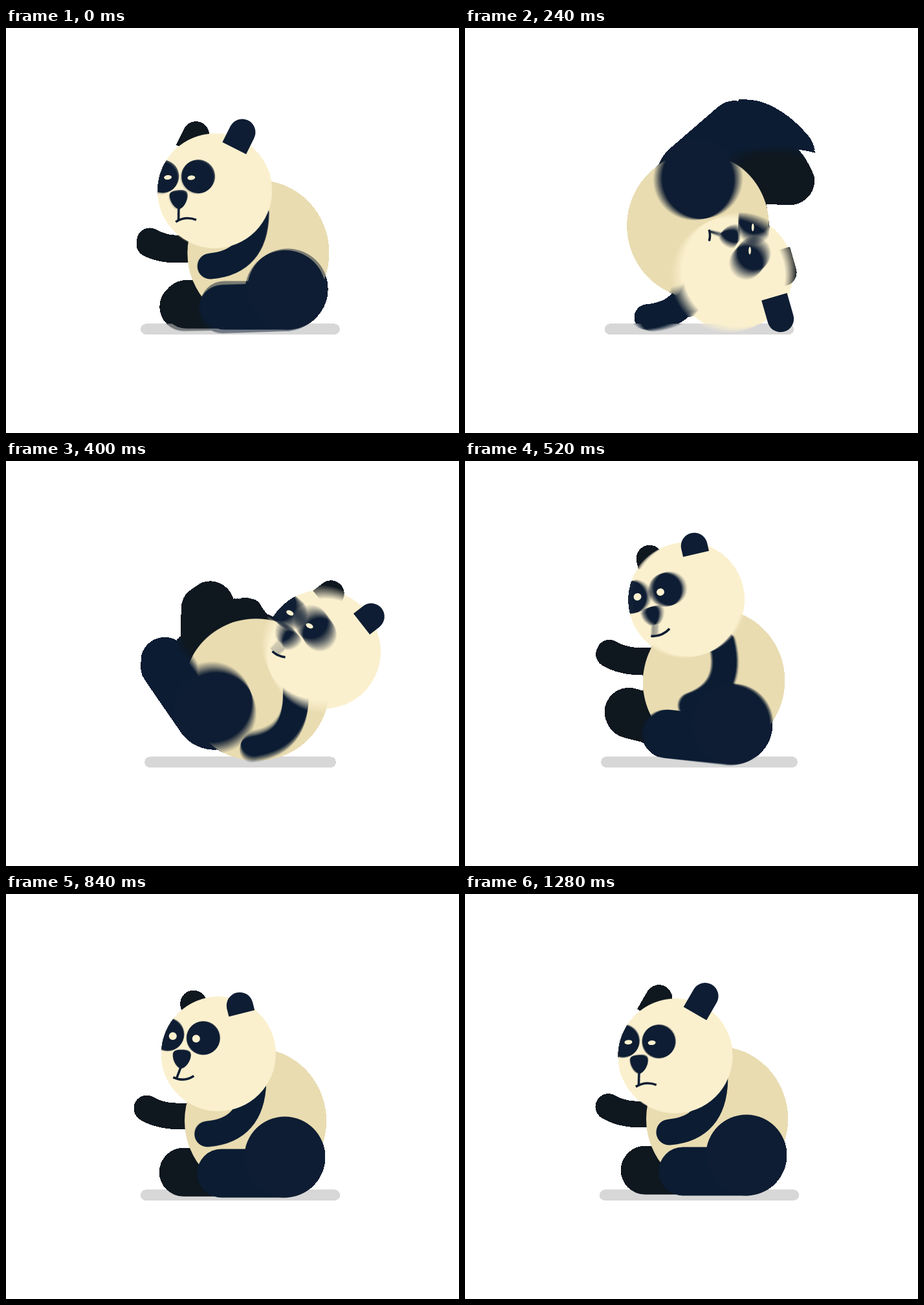
Write an HTML page with a canvas that moves like this. It is 700 px wide and 625 px high and loops after 1320 ms.

```html
<!DOCTYPE html>
<html lang="en">
<head>
<meta charset="utf-8">
<title>Rolling panda</title>
<style>
  html, body { margin: 0; width: 100%; height: 100%; overflow: hidden; background: #fff; }
  canvas { display: block; width: 700px; height: 625px; }
</style>
</head>
<body>
<canvas id="stage" width="700" height="625"></canvas>
<script>
const W = 700, H = 625, LOOP = 1320, STEP = 40;
const SHUTTER = 20, SAMPLES = 12, SOLID = 0.35;
const NAVY = '#0e1d33', LEG = '#0b1c33', DARK = '#0f171f';
const CREAM = '#fbf0ce', BODY = '#e9dcb1', GROUND = '#d7d7d7';
const RAD = Math.PI / 180;

// Key poses: time, body x, y, turn, neck length, neck angle, nod, ear swing
const KEYS = [
  [0, 390, 347, 0, 117, 235, -5.5, 32],
  [120, 352, 335, -78, 96, 233, -37, 68],
  [240, 360, 306, -172, 92, 224.5, -97, 73],
  [400, 387, 353, -265, 119.5, 233.7, -68, 25],
  [520, 384.5, 340, -345, 133, 236.4, -33, 5],
  [640, 385, 350, -360, 118, 238, -6, -10],
  [840, 385.5, 350, -360, 118, 241, 0, -14],
  [1040, 385.5, 349, -360, 122.5, 253.6, 22.5, -29.5],
  [1120, 386, 349, -360, 124, 256, 26, -22],
  [1280, 389.5, 347, -360, 116.5, 236.4, -5, 35]
];
KEYS.push(KEYS[0].map((v, i) => i === 0 ? LOOP : i === 3 ? -360 : v));

const clamp = (v, lo, hi) => Math.min(hi, Math.max(lo, v));
const bump = (t, at, width) => Math.exp(-(((t - at) / width) ** 2));
const ease = (t, from, to) => {
  const u = clamp((t - from) / (to - from), 0, 1);
  return u * u * (3 - 2 * u);
};
const polar = ([x, y], deg, r) => [x + r * Math.cos(deg * RAD), y + r * Math.sin(deg * RAD)];

// Smooth monotone interpolation of the key poses.
function keyed(t) {
  const last = KEYS.length - 1;
  const slope = (i, j) => (KEYS[i + 1][j] - KEYS[i][j]) / (KEYS[i + 1][0] - KEYS[i][0]);
  const tangent = (i, j) => {
    if (i === 0 || i === last) return 0;
    const a = slope(i - 1, j), b = slope(i, j);
    return a * b <= 0 ? 0 : 2 * a * b / (a + b);
  };
  let i = 0;
  while (i < last - 1 && t >= KEYS[i + 1][0]) i++;
  const a = KEYS[i], b = KEYS[i + 1], h = b[0] - a[0], u = (t - a[0]) / h;
  const v = ease(u, 0, 1), p = u * (1 - u) * (1 - u) * h, q = u * u * (u - 1) * h;
  return a.map((from, j) => from + (b[j] - from) * v + tangent(i, j) * p + tangent(i + 1, j) * q);
}

// A limb that keeps its own angle on the stage while its shoulder rolls along.
const arm = (shoulder, angle, length, bend, reach) =>
  [shoulder, polar(shoulder, angle - bend, reach), polar(shoulder, angle, length)];

function pose(t) {
  const [, x, y, turn, neck, neckAngle, nod, swing] = keyed(t);
  const center = [x, y - 25 * bump(t, 180, 35)];
  const onBody = (deg, r) => polar(center, deg + turn, r);
  const look = Math.max(0, nod) / 26, tuck = bump(t, 400, 60), roll = bump(t, 300, 130);
  return {
    center, turn, swing, look, roll,
    head: onBody(neckAngle, neck),
    headTurn: turn + nod,
    earLength: 33 + clamp((swing - 20) * 1.25, 0, 23),
    mood: ease(t, 0, 640) - ease(t, 1130, 1290),
    hip: onBody(51 + 31 * bump(t, 240, 160), 72),
    legTurn: turn - 55 * bump(t, 305, 160),
    smear: bump(t, 240, 40),
    farFoot: onBody(144.5, 136.5 + 22 * bump(t, 240, 200)),
    farLegTurn: turn - 8 * bump(t, 240, 150),
    nearArm: arm(onBody(267, 61), 131 - 15 * bump(t, 520, 100) + 38 * look, 108, 40, 76),
    farArm: arm(onBody(185 + 22 * look, 92 + 16 * look),
      188 + 55 * look - 95 * bump(t, 200, 110) + 42 * tuck, 77 - 34 * tuck, 14, 50 - 25 * tuck),
    ground: 154 - 8.5 * bump(t, 290, 200)
  };
}

const scene = document.createElement('canvas');
scene.width = W;
scene.height = H;
const g = scene.getContext('2d', { willReadFrequently: true });
const out = document.getElementById('stage').getContext('2d');

function oval(x, y, rx, ry, color) {
  g.fillStyle = color;
  g.beginPath();
  g.ellipse(x, y, rx, ry, 0, 0, 7);
  g.fill();
}
const disc = (x, y, r, color) => oval(x, y, r, r, color);

function line(width, color, cap, [a, b, c]) {
  g.strokeStyle = color;
  g.lineWidth = width;
  g.lineCap = cap;
  g.beginPath();
  g.moveTo(...a);
  if (c) g.quadraticCurveTo(...b, ...c); else g.lineTo(...b);
  g.stroke();
}

function placed([x, y], deg, draw) {
  g.save();
  g.translate(x, y);
  g.rotate(deg * RAD);
  draw();
  g.restore();
}

function fillPath(d, color) {
  g.fillStyle = color;
  g.fill(new Path2D(d));
}

function drawEar(p, at, color) {
  const r = 20.5, side = r - p.earLength;
  placed(p.head, p.headTurn, () => placed(at, p.swing, () =>
    fillPath(`M${-r} 0V${side}A${r} ${r} 0 0 1 ${r} ${side}V0Z`, color)));
}

function drawLeg(p) {
  const s = p.smear, q = (x, y) => `${-98 + (x + 98) * s} ${25 + (y - 25) * s}`;
  placed(p.hip, p.legTurn, () => {
    line(75, LEG, 'round', [[0, 25], [-98, 25]]);
    if (s > 0.01) {
      fillPath(`M-129 50C${q(-170, 20)} ${q(-178, -34)} ${q(-174, -81)}` +
        `C${q(-144, -43)} ${q(-104, -13)} -73 -7L-98 25Z`, LEG);
    }
  });
  disc(...p.hip, 62.5, NAVY);
}

function mouth(p) {
  const x = -49 - 5 * p.mood - 8 * p.roll + 5 * p.look, y = 42 - 7 * p.mood;
  const tilt = -4 * p.mood - 19 * p.look ** 2, half = 16 - 9 * p.roll;
  return [polar([x, y], tilt + 180, half), polar([x, y], tilt + 90, 17 * p.mood - 8),
    polar([x, y], tilt, half)];
}

function drawHead(p) {
  disc(0, 0, 88.5, CREAM);
  g.save();
  g.beginPath();
  g.arc(0, 0, 88.5, 0, 7);
  g.clip();
  disc(-78.5, -30, 25.5, NAVY);
  g.restore();
  disc(-23.5, -24.5, 26, NAVY);
  fillPath('M-70.5 2.5C-71.5-5.5-64.5-6.5-57.5-6.5C-49.5-6.5-42.5-5.5-42.5 1.5' +
    'C-42.5 11.5-51.5 22.5-57.5 22.5C-63.5 22.5-70.5 11.5-70.5 2.5Z', NAVY);
  const [a, b] = mouth(p);
  line(3.6, NAVY, 'butt', [[-58, 20], [a[0] * 0.7 + b[0] * 0.3, a[1] * 0.7 + b[1] * 0.3]]);
}

// Everything the shutter blurs; the far ear holds still.
function drawMoving(p, still) {
  g.clearRect(0, 0, W, H);
  line(16.5, GROUND, 'round', [[370.2 - p.ground, 464.7], [353.8 + p.ground, 464.7]]);
  line(40, DARK, 'round', p.farArm);
  placed(p.farFoot, p.farLegTurn, () => line(75, DARK, 'round', [[0, 0], [98, 0]]));
  drawEar(still, [-35.5, -65.5], DARK);
  placed(p.center, p.turn, () => oval(0, 0, 109.5, 112, BODY));
  line(40, LEG, 'round', p.nearArm);
  drawLeg(p);
  placed(p.head, p.headTurn, () => drawHead(p));
}

// Parts that stay sharp.
function drawSharp(p) {
  g.clearRect(0, 0, W, H);
  placed(p.head, p.headTurn, () => {
    const eye = 3.5 + 2.5 * p.mood - 3 * p.roll;
    oval(-70.5, -27.5, 6, eye, CREAM);
    oval(-34.5, -23.5, 6, eye, CREAM);
    line(3.6, NAVY, 'butt', mouth(p));
  });
  drawEar(p, [36, -62.5], NAVY);
}

// Average over the open shutter, then harden the outer silhouette.
function blurred(t) {
  const sum = new Float32Array(W * H * 4), still = pose(t);
  for (let k = 0; k < SAMPLES; k++) {
    const shift = ((k + 0.5) / SAMPLES - 0.5) * SHUTTER;
    drawMoving(pose((t + shift + LOOP) % LOOP), still);
    const px = g.getImageData(0, 0, W, H).data;
    for (let i = 0; i < px.length; i += 4) {
      const a = px[i + 3];
      if (!a) continue;
      for (let c = 0; c < 3; c++) sum[i + c] += px[i + c] * a;
      sum[i + 3] += a;
    }
  }
  const img = g.createImageData(W, H);
  for (let i = 0; i < sum.length; i += 4) {
    const a = sum[i + 3];
    if (a < 255 * SAMPLES * SOLID) continue;
    for (let c = 0; c < 3; c++) img.data[i + c] = sum[i + c] / a;
    img.data[i + 3] = 255;
  }
  return img;
}

const frames = [];
let shown = -1, start;
function show(i) {
  if (i === shown) return;
  shown = i;
  const t = i * STEP;
  out.putImageData(frames[i] || (frames[i] = blurred(t)), 0, 0);
  drawSharp(pose(t));
  out.drawImage(scene, 0, 0);
}
function tick(now) {
  if (start === undefined) start = now;
  show(Math.floor(Math.max(0, now - start) % LOOP / STEP));
  requestAnimationFrame(tick);
}
show(0);
requestAnimationFrame(tick);
</script>
</body>
</html>
```
